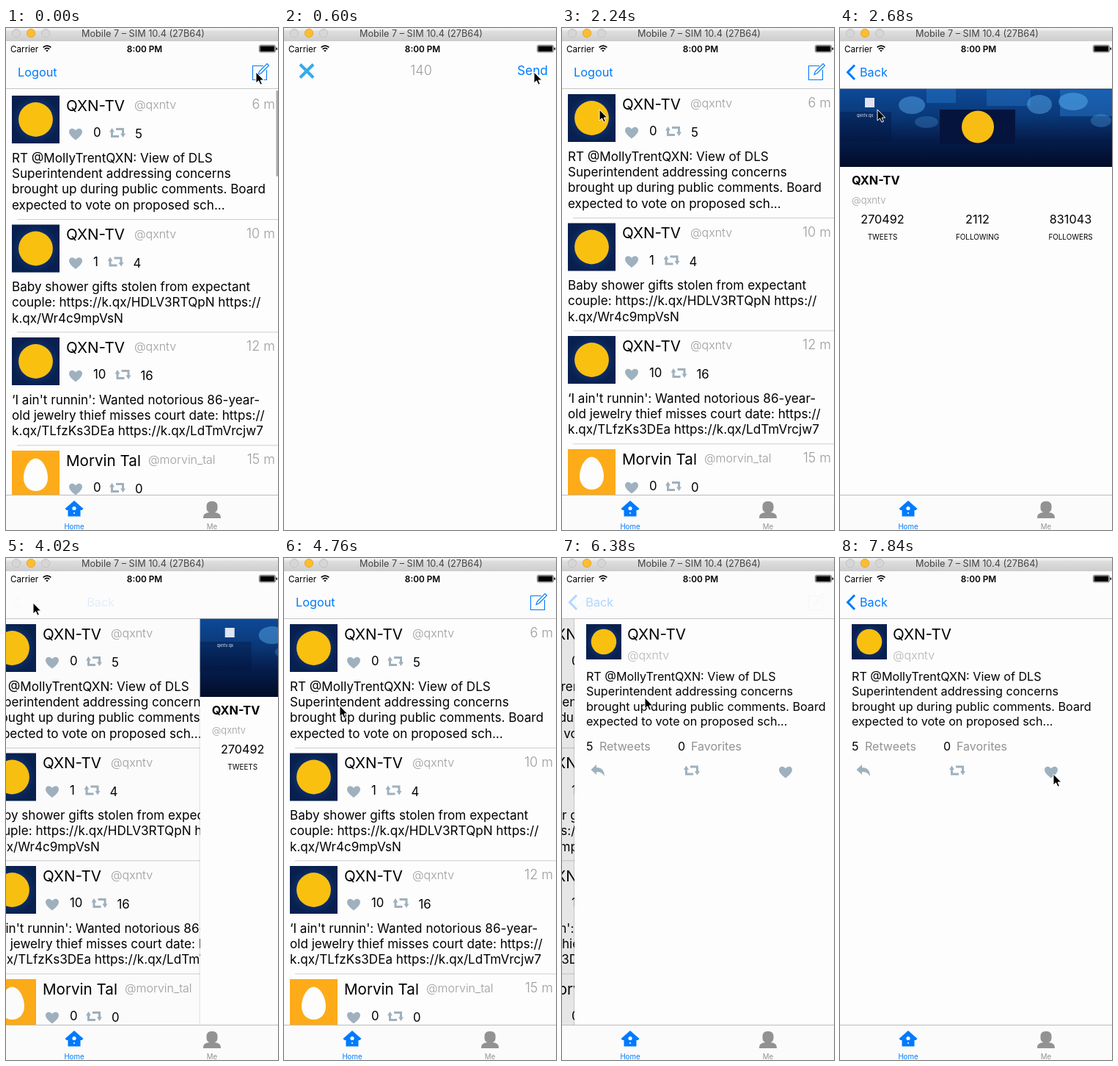
Animation, 371 px wide and 683 px high, one loop 7.99 s. Source, as an HTML page:

```html
<!DOCTYPE html>
<html lang="en">
<head>
<meta charset="utf-8">
<title>Feed app</title>
<style>
  html, body { margin: 0; width: 100%; height: 100%; overflow: hidden; background: #fdfdfd; }
  svg { display: block; width: 100%; height: 100%; }
  text { font-family: Inter, "Open Sans", sans-serif; }
  .mid { text-anchor: middle; }
  .end { text-anchor: end; }
  .soft { fill: #9c9c9c; font-weight: 300; }
  .blue { fill: #007aff; }
  .icon { fill: #9fb1be; }
</style>
</head>
<body>
<svg viewBox="0 0 371 683">
  <defs>
    <linearGradient id="bar" x2="0" y2="1">
      <stop offset=".1" stop-color="#f3f3f3"/><stop offset=".25" stop-color="#dedede"/><stop offset="1" stop-color="#cdcdcd"/>
    </linearGradient>
    <radialGradient id="tile">
      <stop stop-color="#17469a"/><stop offset="1" stop-color="#08204f"/>
    </radialGradient>
    <linearGradient id="sky" x2="0" y2="1">
      <stop stop-color="#0d4a98"/><stop offset=".35" stop-color="#0a3878"/>
      <stop offset=".65" stop-color="#051d4c"/><stop offset="1" stop-color="#020c28"/>
    </linearGradient>
    <path id="heart" d="M0 8C-4 5-9 1-9-3.5C-9-8-3-9.5 0-5C3-9.5 9-8 9-3.5C9 1 4 5 0 8z"/>
    <g id="repost">
      <path d="M-7.5-2V5H2M7.5 2V-5H-2" fill="none" stroke="#9fb1be" stroke-width="3"/>
      <path d="M-11-1L-7.5-6.5-4-1zM11 1L7.5 6.5 4 1z"/>
    </g>
    <path id="reply" d="M-9.5-1L-2-8V-4C5-4 9 0 9 8C6 3 3 2-2 2V6z"/>
  </defs>
  <rect width="371" height="683" fill="#fdfdfd"/>
  <g id="list"></g>
  <rect id="dim" y="82" width="371" height="554"/>
  <g id="profile"></g>
  <g id="detail"></g>

  <rect y="18" width="371" height="64" fill="#fcfcfc"/>
  <rect y="82" width="371" height=".8" fill="#b8b8b8"/>
  <g id="homeNav">
    <text class="blue" x="16" y="66" font-size="16.3">Logout</text>
    <path d="M351 51.5H336.5V70.5H355.5V57M344 63.5L345.5 59 356 48.5 358.5 51 348 61.5z" fill="none" stroke="#007aff" stroke-width="1.1"/>
  </g>
  <path id="chevron" d="M20 50.5L10.5 60.2 20 70" fill="none" stroke="#007aff" stroke-width="3"/>
  <text id="back" class="blue" y="66" font-size="16.2">Back</text>

  <rect y="635" width="371" height="48" fill="#fbfbfb"/>
  <rect y="635" width="371" height="1" fill="#bcbcbc"/>
  <path class="blue" d="M93 643L105.5 654 103.5 656H101.5V664.5H84.5V656H82.5L80.5 654z"/>
  <circle cx="93" cy="653.5" r="2.6" fill="#fff"/>
  <circle cx="93" cy="660" r="1.1" fill="#fff"/>
  <text class="mid blue" x="93" y="681.5" font-size="9.7">Home</text>
  <g fill="#929292">
    <rect x="273.5" y="644" width="15" height="15.5" rx="6"/>
    <path d="M277 656H285V659C290 660 293 661 293 667H269C269 661 272 660 277 659z"/>
    <text class="mid" x="281" y="681.5" font-size="9.7">Me</text>
  </g>

  <g id="modal">
    <rect width="371" height="665" fill="#fdfdfd"/>
    <path d="M22 31.5L40 49.5M40 31.5L22 49.5" stroke="#35aaea" stroke-width="4"/>
    <text class="mid soft" x="187" y="46" font-size="18">140</text>
    <text class="blue" x="318" y="46" font-size="17.3">Send</text>
  </g>

  <text x="6" y="32.5" font-size="11.7">Carrier</text>
  <path d="M50.6 26.4Q56 21.8 61.4 26.4M52.7 28.8Q56 26 59.3 28.8" fill="none" stroke="#000" stroke-width="1.7"/>
  <path d="M54.2 30.6Q56 29.2 57.8 30.6L56 32.6z"/>
  <text class="mid" x="189" y="32.5" font-size="11.8" font-weight="600">8:00 PM</text>
  <rect x="345.4" y="23.4" width="22" height="9.6" rx="2" fill="none" stroke="#000" stroke-width=".6"/>
  <rect x="346.5" y="24.5" width="19.8" height="7.4" rx="1"/>
  <rect x="368.5" y="26.5" width="1.5" height="3.5" rx=".7"/>

  <rect width="371" height="18" fill="url(#bar)"/>
  <g fill="#d6d6d6" stroke="#bdbdbd" stroke-width=".8">
    <circle cx="14" cy="7" r="5.7"/>
    <circle cx="34" cy="7" r="5.7" fill="#fdbd2e" stroke="#e0a028"/>
    <circle cx="54" cy="7" r="5.7"/>
  </g>
  <text class="mid" x="187" y="12" font-size="12.7" fill="#444">Mobile 7 – SIM 10.4 (27B64)</text>

  <path id="cursor" d="M0 0V15L3.5 11.8 6 17.2 8.4 16.2 6.1 11H10.7z" stroke="#fff"/>
</svg>
<script>
const $ = id => document.getElementById(id);
const STATION = "QXN-TV", HANDLE = "@qxntv";
const LEAD = ["RT @MollyTrentQXN: View of DLS", "Superintendent addressing concerns",
  "brought up during public comments. Board", "expected to vote on proposed sch..."];

const text = (x, y, size, str, attrs = "") =>
  `<text x="${x}" y="${y}" font-size="${size}" ${attrs}>${str}</text>`;
const lines = (x, y, size, gap, rows) =>
  rows.map((s, i) => text(x, y + i * gap, size, s)).join("");
const icon = (name, x, y) => `<use href="#${name}" class="icon" x="${x}" y="${y}"/>`;
const rect = (x, y, w, h, fill, op = 1) =>
  `<rect x="${x}" y="${y}" width="${w}" height="${h}" fill="${fill}" opacity="${op}"/>`;
const glow = (x, y, rx, ry, op) =>
  `<ellipse cx="${x}" cy="${y}" rx="${rx}" ry="${ry}" fill="#5db0f2" opacity="${op}"/>`;
const badge = (x, y, size) => rect(x, y, size, size, "url(#tile)") +
  `<circle cx="${x + size / 2}" cy="${y + size / 2}" r="${size * .36}" fill="#f9c010"/>`;
const egg = (x, y) => rect(x, y, 65, 65, "#fdab18") +
  `<path transform="translate(${x + 32.5} ${y + 33})" fill="#fdfdfd"
    d="M0-22.5C9-22.5 16.5-8 16.5 4C16.5 15 9 22 0 22S-16.5 15-16.5 4C-16.5-8-9-22.5 0-22.5z"/>`;

// Feed rows
const rows = [
  { top: 82.5, age: "6 m", likes: 0, shares: 5, iconX: 152, body: LEAD },
  { top: 258, age: "10 m", likes: 1, shares: 4, iconX: 149.5, body: [
    "Baby shower gifts stolen from expectant",
    "couple: https://k.qx/HDLV3RTQpN https://", "k.qx/Wr4c9mpVsN"] },
  { top: 411.5, age: "12 m", likes: 10, shares: 16, iconX: 159.5, body: [
    "‘I ain't runnin': Wanted notorious 86-year-",
    "old jewelry thief misses court date: https://",
    "k.qx/TLfzKs3DEa https://k.qx/LdTmVrcjw7"] },
  { top: 565.5, age: "15 m", likes: 0, shares: 0, iconX: 152, body: [],
    name: "Morvin Tal", handle: "@morvin_tal", handleX: 194 },
];
$("list").innerHTML = rows.map((r, i) =>
  `<g transform="translate(0 ${r.top})">` +
  (i ? rect(15, 0, 356, .8, "#c4c4c6") : "") +
  (r.name ? egg(8, 7.5) : badge(8, 7.5, 65)) +
  text(82, 28, 20.6, r.name || STATION) +
  text(r.handleX || 175, 25.5, 16, r.handle || HANDLE, 'class="soft"') +
  text(367, 25.5, 18, r.age, 'class="soft end"') +
  icon("heart", 95, 60) + text(119, 63.5, 16.8, r.likes) +
  icon("repost", r.iconX, 58) + text(r.iconX + 24, 65.5, 16.8, r.shares) +
  lines(8, 98, 17.1, 21.4, r.body) + "</g>").join("") +
  `<rect id="thumb" x="368.5" y="83" width="2.5" height="117" rx="1.2" fill="#aaa"/>`;

// Pushed screens
const page = rect(-1, 82, 1, 554, "#000", .15) + rect(0, 82, 371, 554, "#fdfdfd");
const stat = (x, n, label) => text(x, 265.5, 16.2, n, 'class="mid"') +
  text(x, 287.5, 9.9, label, 'class="mid"');
$("profile").innerHTML = page + rect(0, 82, 371, 107, "url(#sky)") +
  rect(118, 82, 40, 20, "#2f86dc", .35) + rect(200, 84, 60, 22, "#2f7fd0", .35) +
  rect(300, 84, 71, 36, "#2f86dc", .4) + rect(0, 114, 70, 40, "#01123a", .35) +
  glow(98, 105, 18, 12, .45) + glow(118, 128, 16, 8, .25) + glow(272, 104, 17, 13, .45) +
  glow(318, 100, 20, 12, .5) + glow(356, 126, 14, 9, .3) +
  rect(136, 111, 103, 47, "#05143c") +
  '<circle cx="188" cy="134.5" r="22" fill="#f7bd12"/>' +
  rect(34, 95, 13, 13, "#dfe4f2") + text(23, 121, 5.5, "qxntv.qx", 'fill="#dde6f5"') +
  text(16, 213, 16.3, STATION, 'font-weight="700"') +
  text(16, 238.5, 13, HANDLE, 'class="soft"') +
  stat(58, 270492, "TWEETS") + stat(187.5, 2112, "FOLLOWING") + stat(314.5, 831043, "FOLLOWERS");
$("detail").innerHTML = page + badge(16, 90, 48) +
  text(72, 111, 20.6, STATION) + text(72, 138, 16, HANDLE, 'class="soft" opacity=".75"') +
  lines(16, 167, 16.15, 20.3, LEAD) +
  text(16, 261.5, 16, 5) + text(34, 261.5, 16, "Retweets", 'fill="#929292"') +
  text(141, 261.5, 16, 0) + text(159, 261.5, 16, "Favorites", 'fill="#929292"') +
  icon("reply", 32, 289) + icon("repost", 160, 289) + icon("heart", 288, 291.5);

const LOOP = 7990, STEP = 148;
const path = [[0, 341, 60], [4, 341, 60], [8, 36, 55], [11, 36, 55], [15, 51, 111],
  [19, 51, 111], [22, 37, 61], [28, 37, 61], [32, 76, 201], [35, 76, 201],
  [38, 119, 97], [40, 113, 190], [43, 113, 190], [49, 163, 306], [53, 291, 294], [60, 291, 294]];
const clamp = v => Math.min(1, Math.max(0, v));
const ramp = (k, start, len) => clamp((k - start) / len);
const easeOut = p => 1 - (1 - p) ** 3;
const smooth = p => p * p * (3 - 2 * p);
const move = (id, x, y) => $(id).setAttribute("transform", `translate(${x} ${y})`);
const fade = (id, a) => $(id).setAttribute("opacity", clamp(a));

function draw(k) {
  const show = easeOut(ramp(k, .5, 3.4)) - easeOut(ramp(k, 8.91, 3.4));
  move("modal", 0, 18 + 665 * (1 - show));

  const push = ramp(k, 15.2, 2.8), pop = ramp(k, 26.05, 2.8), open = ramp(k, 41.2, 2.8);
  const profile = easeOut(push) - easeOut(pop), detail = easeOut(open);
  const shown = profile + detail, linear = push - pop + open;
  move("profile", 372 * (1 - profile), 0);
  move("detail", 372 * (1 - detail), 0);
  move("list", -111 * shown, k < 1 ? 2 : 0);
  fade("thumb", k < 1 ? 1 : 0);
  fade("dim", .1 * shown ** 2);

  // Bar items fade faster on the way back
  const leaving = pop > 0 && !open, bar = clamp(2 * linear - 1);
  fade("homeNav", 1 - 1.5 * linear);
  fade("back", leaving ? bar ** 2 : bar);
  fade("chevron", leaving ? bar ** 4 : bar);
  move("back", 27 + 117 * (1 - shown), 0);

  const i = path.findIndex(p => p[0] > k);
  const [a, x0, y0] = path[i - 1], [b, x1, y1] = path[i];
  const p = smooth((k - a) / (b - a));
  move("cursor", x0 + (x1 - x0) * p, y0 + (y1 - y0) * p);
}

function tick() {
  draw(Math.floor(performance.now() % LOOP / STEP + .05));
  requestAnimationFrame(tick);
}
tick();
</script>
</body>
</html>
```
